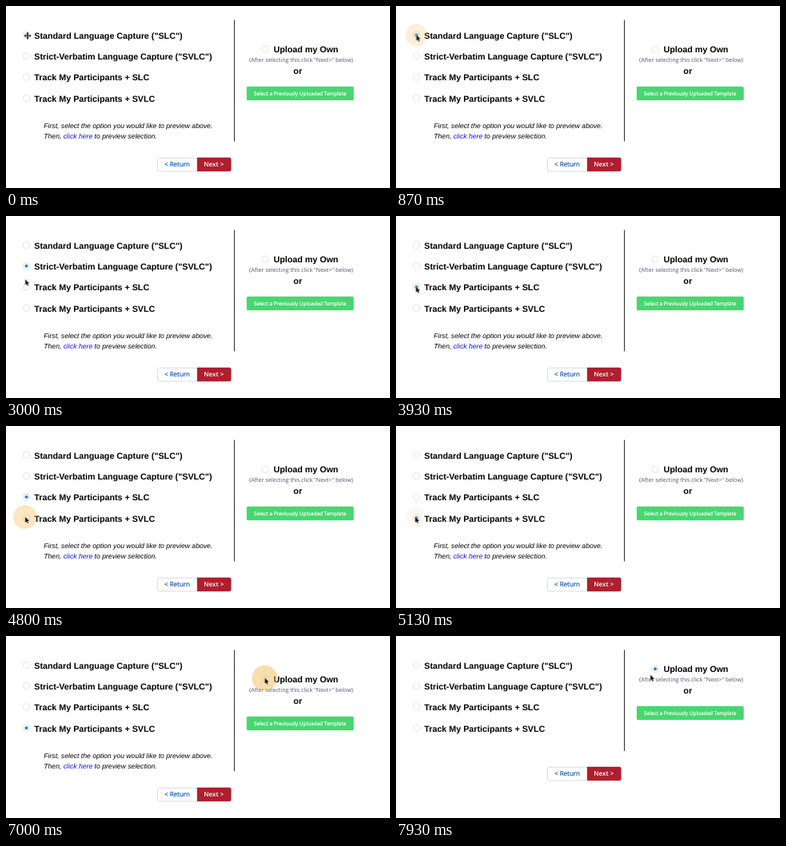
Recreate the animation shown at these times as an HTML page. Size 480 by 228 pixels, loop 8 s.

```html
<!DOCTYPE html>
<html lang="en">
<head>
<meta charset="utf-8">
<title>Template selection</title>
<style>
  html, body { margin: 0; width: 100%; height: 100%; overflow: hidden; background: #fff; }
  svg { display: block; width: 100vw; height: 100vh; text-rendering: geometricPrecision; }
  .label { font: bold 10.72px "Liberation Sans", Arial, sans-serif; }
  .note { font: italic 8.63px "Liberation Sans", Arial, sans-serif; }
  .ui { font-family: "Open Sans", "Noto Sans", sans-serif; }
  .mid { text-anchor: middle; }
  .heavy { stroke: currentColor; fill: currentColor; stroke-width: .2; }
  .ring { fill: #fff; stroke: #dedede; stroke-width: .8; }
  .soft { stroke-width: 1; stroke-opacity: .35; }
  .rule { stroke: #333; stroke-width: 1.1; }

  .dot, .note, .tail, .right, .nav, .cross, .arrow { animation: 8s step-end infinite; }
  .d1 { animation-name: pick1; }
  .d2 { animation-name: pick2; }
  .d3 { animation-name: pick3; }
  .d4 { animation-name: pick4; }
  .d5 { animation-name: pick5; }
  .note, .tail { animation-name: drop; }
  .right { animation-name: lift; }
  .nav { animation-name: lift2; }
  .cross { animation-name: cross; }
  .arrow { animation-name: arrow; }
  .pointer { animation: travel 8s linear infinite; }
  .halo { animation: press 8s linear infinite; }

  @keyframes pick1 { 0% { opacity: .45 } 7% { opacity: 1 } 32.5%, 100% { opacity: 0 } }
  @keyframes pick2 { 0% { opacity: 0 } 32.5% { opacity: 1 } 44.2%, 100% { opacity: 0 } }
  @keyframes pick3 { 0% { opacity: 0 } 44.2% { opacity: 1 } 61.6%, 100% { opacity: 0 } }
  @keyframes pick4 { 0% { opacity: 0 } 61.6% { opacity: 1 } 89%, 100% { opacity: 0 } }
  @keyframes pick5 { 0% { opacity: 0 } 89%, 100% { opacity: 1 } }
  @keyframes drop { 0% { opacity: 1 } 89%, 100% { opacity: 0 } }
  @keyframes lift { 0% { transform: none } 89%, 100% { transform: translateY(-13px) } }
  @keyframes lift2 { 0% { transform: none } 89%, 100% { transform: translateY(-26px) } }
  @keyframes cross { 0% { opacity: 1 } .88%, 100% { opacity: 0 } }
  @keyframes arrow { 0% { opacity: 0 } .88%, 100% { opacity: 1 } }

  @keyframes travel {
    0%, 24.1% { transform: translate(25.5px, 36.2px); animation-timing-function: ease-in-out }
    26.7%, 35% { transform: translate(26.5px, 63.2px); animation-timing-function: ease-in }
    37.5% { transform: translate(24px, 79.2px); animation-timing-function: ease-out }
    39.2%, 51.5% { transform: translate(25px, 88.5px); animation-timing-function: ease-in-out }
    56.5%, 68.4% { transform: translate(24px, 113.7px); animation-timing-function: cubic-bezier(.4, 0, .5, 1) }
    76.6% { transform: translate(347.3px, 55px) }
    78.4% { transform: translate(333px, 51.5px); animation-timing-function: ease-out }
    80.9%, 95.4% { transform: translate(323.5px, 52.5px); animation-timing-function: ease-in-out }
    99.1%, 100% { transform: translate(318px, 48.5px) }
  }
  /* the halo swells as it fades in and shrinks as it fades out */
  @keyframes press {
    0%, 6%, 11.7%, 29.5%, 35%, 42%, 47.5%, 58.5%, 64.5%, 85.8%, 91.6%, 100% { opacity: 0; transform: scale(.72) }
    7%, 10%, 30.5%, 33%, 43%, 45.5%, 60.5%, 62.5%, 87%, 89.7% { opacity: 1; transform: none }
  }
</style>
</head>
<body>
<svg viewBox="0 0 480 228" preserveAspectRatio="none">
  <defs>
    <circle id="ring" class="ring" r="4.1"/>
    <g id="on">
      <circle r="4.1" fill="#fff" stroke="#d3e2f2" stroke-width=".8"/>
      <circle r="2" fill="#2378d4"/>
    </g>
  </defs>

  <g class="label">
    <text x="35.3" y="40.6">Standard Language Capture ("SLC")</text>
    <text x="35.3" y="66.9">Strict-Verbatim Language Capture ("SVLC")</text>
    <text x="35.3" y="93.2">Track My Participants + SLC</text>
    <text x="35.3" y="119.5">Track My Participants + SVLC</text>
  </g>
  <use href="#ring" x="25.5" y="36.4"/>
  <use href="#ring" x="25.5" y="62.6"/>
  <use href="#ring" x="25.5" y="88.9"/>
  <use href="#ring" x="25.5" y="115.2"/>
  <use class="dot d1" href="#on" x="25.5" y="36.4"/>
  <use class="dot d2" href="#on" x="25.5" y="62.6"/>
  <use class="dot d3" href="#on" x="25.5" y="88.9"/>
  <use class="dot d4" href="#on" x="25.5" y="115.2"/>

  <g class="note">
    <text x="47.3" y="153.3">First, select the option you would like to preview above.</text>
    <text x="47.3" y="166">Then, <tspan fill="#1010ee">click here</tspan> to preview selection.</text>
  </g>

  <path class="rule" d="M285.5 17.5V144"/>
  <path class="rule tail" d="M285.5 144V169.5"/>

  <g class="right">
    <use href="#ring" x="324" y="54.2"/>
    <use class="dot d5" href="#on" x="324" y="54.2"/>
    <text class="label" x="334.4" y="58.2">Upload my Own</text>
    <text class="ui mid" x="369" y="70" font-size="7.1" fill="#4c5573">(After selecting this click "Next&gt;" below)</text>
    <text class="label mid" x="364.7" y="85.1">or</text>
    <rect class="soft" x="301" y="101" width="133.5" height="17" rx="1.5" fill="#48d671" stroke="#48d671"/>
    <text class="ui mid heavy" x="367.7" y="112" font-size="6.43" color="#fff">Select a Previously Uploaded Template</text>
  </g>

  <g class="nav ui" font-size="8">
    <rect x="189.5" y="190.4" width="91.5" height="16.6" rx="2" fill="#fff" stroke="#d5d8de" stroke-width=".9"/>
    <path class="soft" d="M239 190H279.3a2 2 0 0 1 2 2V205a2 2 0 0 1-2 2H239Z" fill="#b01e2e" stroke="#b01e2e"/>
    <text class="mid heavy" x="214" y="201.3" color="#1158b4">&lt; Return</text>
    <text class="mid" x="259.8" y="201.3" fill="#fff" font-weight="600">Next &gt;</text>
  </g>

  <g class="pointer">
    <g transform="translate(-.2 .2)">
      <circle class="halo" r="16" fill="#f3b446" fill-opacity=".45"/>
    </g>
    <path class="arrow" d="M0 0V8.2L1.9 6.5L3.2 9.4L4.6 8.8L3.3 5.9H5.8Z" transform="scale(.88)" fill="#111" stroke="#fff" stroke-width=".8" paint-order="stroke"/>
  </g>
  <g class="cross" transform="translate(27 37.3)">
    <path d="M0-4.6L1.8-2.6H.6V-.6H2.6V-1.8L4.6 0L2.6 1.8V.6H.6V2.6H1.8L0 4.6L-1.8 2.6H-.6V.6H-2.6V1.8L-4.6 0L-2.6-1.8V-.6H-.6V-2.6H-1.8Z" fill="#000" stroke="#fff" stroke-width=".8" paint-order="stroke"/>
  </g>
</svg>
</body>
</html>
```
